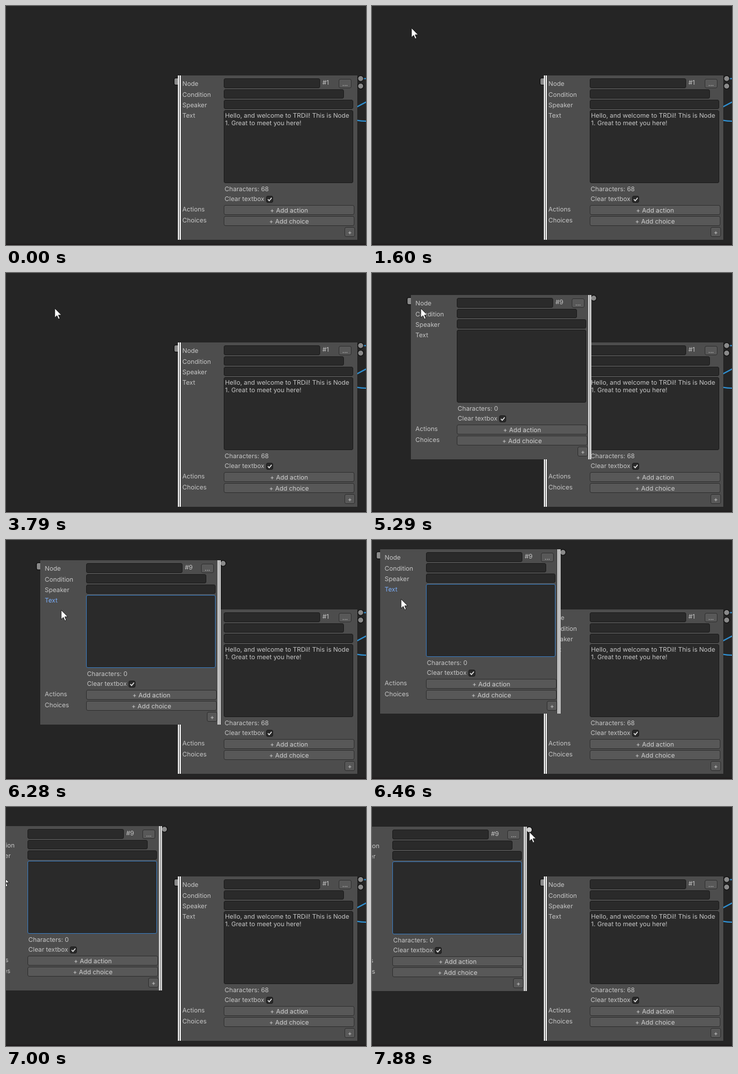
These frames come from a looping animation (620x413 px, 8000 ms). An HTML page:

```html
<!DOCTYPE html>
<html lang="en">
<head>
<meta charset="utf-8">
<title>Dialogue node editor</title>
<style>
  html, body { margin: 0; width: 100%; height: 100%; overflow: hidden; background: #252525; }
  svg { display: block; width: 100%; height: 100%; }
  text { font: 10.85px Inter, Roboto, sans-serif; fill: #c6c6c6; text-rendering: geometricPrecision; }
  .mid { text-anchor: middle; fill: #d0d0d0; }
  .body { fill: #4d4d4d; }
  .field { fill: #2a2a2a; stroke: #1c1c1c; }
  .button { fill: #585858; stroke: #303030; }
  .port { fill: #8a8a8a; stroke: #0c0c0c; stroke-width: 1.2; }
  .strip { fill: #fff; }
  .link { fill: none; stroke: #2f90d2; stroke-width: 2; }
  .focus .area { stroke: #3a79bb; }
  .focus .label-Text { fill: #7baefa; }
  .hover .out { fill: #d2d2d2; }
  #menu text { font: 11.7px "Open Sans", "Noto Sans", sans-serif; fill: #000; }
</style>
</head>
<body>
<svg id="stage" viewBox="0 0 620 413"></svg>
<script>
const LOOP = 8000;

const box = (cls, x, y, w, h, r = 2.5) =>
  `<rect class="${cls}" x="${x + .5}" y="${y + .5}" width="${w - 1}" height="${h - 1}" rx="${r}"/>`;
const text = (x, y, s, cls = '') => `<text class="${cls}" x="${x}" y="${y}">${s}</text>`;
const label = (y, s) => text(7.8, y, s, 'label-' + s);
const button = (x, y, w, h, s) =>
  box('button', x, y, w, h) + text(x + w / 2, y + h / 2 + 4.2, s, 'mid');
const fieldRow = (y, s, w, h = 16, cls = '') =>
  label(y + 12.6, s) + box('field ' + cls, 79, y, w, h);
const buttonRow = (y, s, action) => label(y + 10.6, s) + button(79, y, 225, 17, action);
const port = (_, i) => `<circle class="port out" cx="314.8" cy="${5.3 + 13 * i}" r="5"/>`;
const strip = x => `<rect class="strip" x="${x}" width="2" height="284"/>`;

// One editor node, with its top left corner at 0,0
function node(id, number, lines, stripX, ports) {
  return `<g id="${id}">
    ${box('port', -7, 4, 14, 13)}
    ${Array.from({ length: ports }, port).join('')}
    <rect class="body" width="309" height="284"/>
    ${fieldRow(5, 'Node', 166, 17)}
    ${text(249, 16.3, '#' + number)}${button(277, 6, 22, 16, '...')}
    ${fieldRow(24, 'Condition', 207)}
    ${fieldRow(42, 'Speaker', 223)}
    ${fieldRow(60, 'Text', 223, 126, 'area')}
    ${lines.map((s, i) => text(81.3, 72.6 + 13 * i, s)).join('')}
    ${text(80.6, 200.4, 'Characters: ' + lines.join(' ').length)}
    ${text(80.6, 217.4, 'Clear textbox')}${box('field', 152, 208, 12, 12)}
    <path d="M155 214l2.3 2.6 4.2-5" fill="none" stroke="#e4e4e4" stroke-width="1.6"/>
    ${buttonRow(224, 'Actions', '+ Add action')}
    ${buttonRow(243, 'Choices', '+ Add choice')}
    ${button(287, 262, 18, 17, '+')}
    <rect x="${stripX}" width="5" height="284" fill="#303030"/>
    ${strip(stripX)}${strip(stripX + 3)}
  </g>`;
}

const stage = document.getElementById('stage');
stage.innerHTML = `
  <rect width="620" height="413" fill="#252525"/>
  <rect y="411" width="620" height="2" fill="#1e1a1b"/>
  <path class="link" d="M612 125.5H620M604 174.5L620 166M604 197.5Q612 199 620 199"/>
  <g transform="translate(296 120)">
    ${node('first', 1, ['Hello, and welcome to TRDil! This is Node', '1. Great to meet you here!'], 0, 2)}
  </g>
  ${node('added', 9, [], 305.5, 1)}
  <g id="menu">
    <rect x="67.5" y="38.5" width="141" height="27" fill="#f2f2f2" stroke="#cfcfcf"/>
    <rect id="item" x="70" y="41" width="136" height="22" fill="#91c9f7"/>
    ${text(102, 56.2, 'Add node')}
  </g>
  <path id="pointer" d="M0 0V16.2L3.8 12.7 6.3 18.6 8.8 17.5 6.3 11.8H11.5Z"
    fill="#fff" stroke="#111" stroke-width=".9"/>`;
const [added, menu, item, pointer] =
  ['added', 'menu', 'item', 'pointer'].map(id => document.getElementById(id));

const ramp = (t, a, b) => Math.min(1, Math.max(0, (t - a) / (b - a)));
const smooth = k => k * k * (3 - 2 * k);
const linear = k => k;

// Each leg is [from ms, to ms, x, y]; the point rests between legs
const glide = (t, start, legs, ease) => legs.reduce(([px, py], [a, b, x, y]) => {
  const k = ease(ramp(t, a, b));
  return [px + (x - px) * k, py + (y - py) * k];
}, start);

const GRAB = 6250, HOME = [67, 38], GRIP = [36, 86];
const dragLegs = [[GRAB, 6460, 14, 16], [6460, 6740, -22, 25], [6740, 6850, -42, 33], [7000, 7030, -44, 34]];
const approach = [
  [980, 1120, 70, 69],
  [1490, 1600, 68, 38],
  [2740, 2970, 78, 43],
  [3530, 3700, 84, 61],
  [5930, 6180, HOME[0] + GRIP[0], HOME[1] + GRIP[1]]
];
const toPort = [[7030, 7880, 271, 43]];

const move = (el, p) => el.setAttribute('transform', `translate(${p.map(Math.round).join(' ')})`);
const show = (el, on) => el.style.display = on ? '' : 'none';

function draw(now) {
  const t = now % LOOP;
  const corner = glide(t, HOME, dragLegs, linear);
  const hand = t < GRAB
    ? glide(t, [86, -20], approach, smooth)
    : corner.map((v, i) => v + GRIP[i]);
  move(added, corner);
  move(pointer, glide(t, hand, toPort, smooth));
  show(pointer, t >= 980);
  show(added, t >= 5290);
  added.classList.toggle('focus', t >= 6200);
  added.classList.toggle('hover', t >= 7830);
  menu.style.opacity = ramp(t, 2600, 2760) - ramp(t, 3660, 3790);
  show(item, t >= 2790);
  requestAnimationFrame(draw);
}
draw(0);
</script>
</body>
</html>
```
